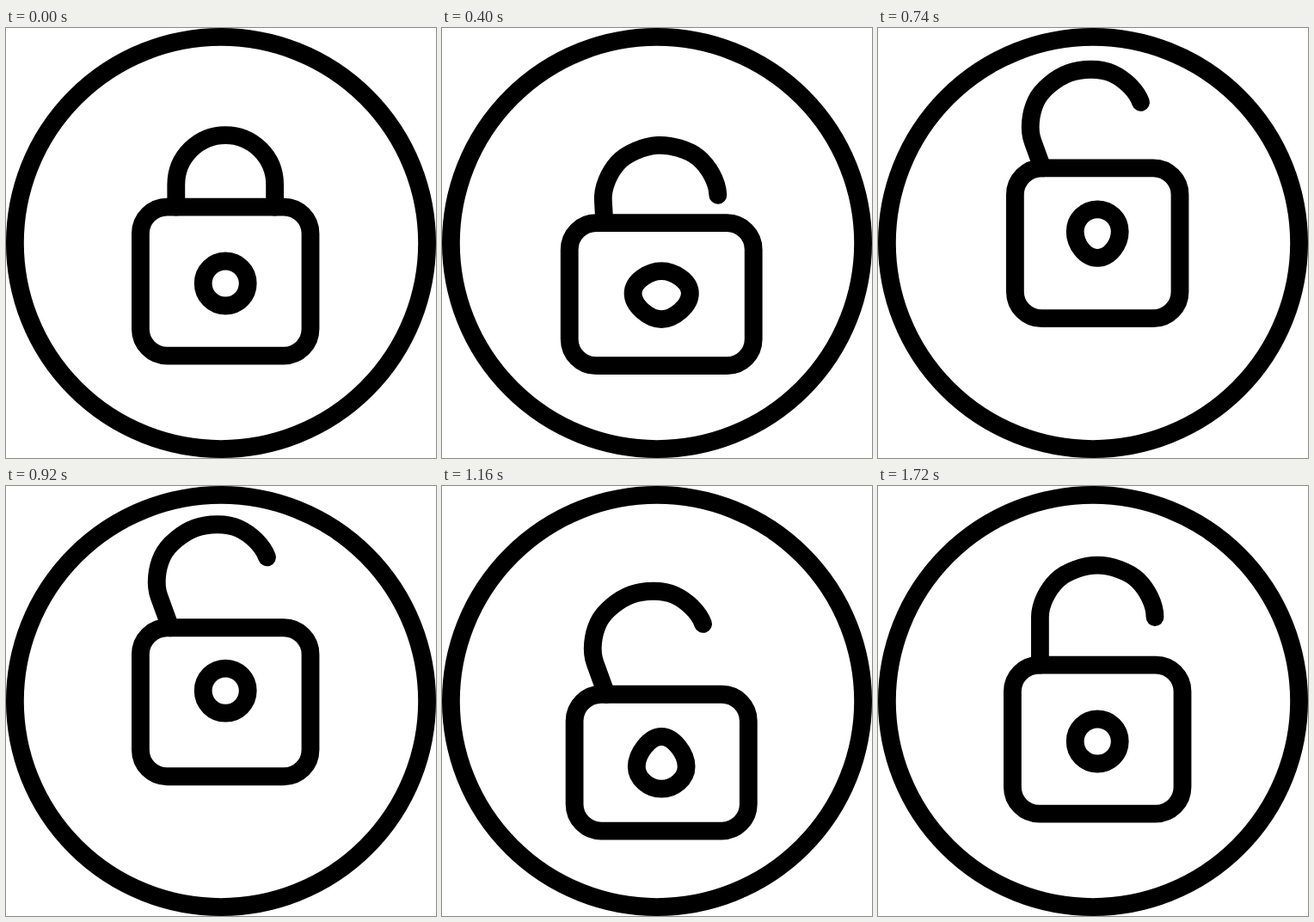
Animation, 500 px wide and 500 px high, one loop 2.42 s. Source, as an HTML page:

```html
<!DOCTYPE html>
<html lang="en">
<head>
<meta charset="utf-8">
<title>Padlock opening</title>
<style>
  html, body { margin: 0; width: 100%; height: 100%; overflow: hidden; background: #fff; }
  svg { display: block; width: 100%; height: 100%; }
</style>
</head>
<body>
<svg viewBox="0 0 500 500" fill="none" stroke="#000" stroke-width="20.8" stroke-linecap="round" stroke-linejoin="round">
  <circle cx="250" cy="250" r="239.6"/>
  <path id="shackle"/>
  <rect id="body" rx="31"/>
  <path id="keyhole"/>
</svg>
<script>
const LOOP = 2420, STEP = 20;
const MID = 255.2;          // vertical axis of the lock
const KEY_HANDLE = 14.4;    // Bezier handles keep their length while points move
const ARCH_HANDLE = 15.2;

// Main beats of the jump, in ms
const CROUCH = 280, FALL = 900, LAND = 1180;

const $ = id => document.getElementById(id);
const body = $('body'), keyhole = $('keyhole'), shackle = $('shackle');

// Smooth 0 to 1 between two times
function ease(t, from, to) {
  const u = Math.min(1, Math.max(0, (t - from) / (to - from)));
  return u * u * (3 - 2 * u);
}

// Smooth 0 to 1 and back to 0
const pulse = (t, from, peak, to) => ease(t, from, peak) - ease(t, peak, to);

// Height during crouch, leap, fall and settling
function hop(t, rest, low, apex, riseEnd, settleEnd) {
  return rest
    + (low - rest) * ease(t, 0, CROUCH)
    + (apex - low) * ease(t, CROUCH, riseEnd)
    + (low + 1.5 - apex) * ease(t, FALL, LAND)
    + (rest - low - 1.5) * ease(t, LAND, settleEnd);
}

function setAttrs(el, attrs) {
  for (const name in attrs) el.setAttribute(name, attrs[name]);
}

function keyholePath(y, w, up, down) {
  const h = KEY_HANDLE, l = MID - w, r = MID + w, top = y - up, low = y + down;
  return `M${MID} ${top}C${MID + h} ${top} ${r} ${y - h} ${r} ${y}`
    + `S${MID + h} ${low} ${MID} ${low}S${l} ${y + h} ${l} ${y}S${MID - h} ${top} ${MID} ${top}Z`;
}

// Starts at the foot of the left leg; the arch is four eighths of a turn
function shacklePath(w, h, leg, tail) {
  let d = `M0 0V${-leg}`;
  for (let i = 0; i < 4; i++) {
    const [a, b] = [i, i + 1].map(n => {
      const c = Math.cos(n * Math.PI / 4), s = Math.sin(n * Math.PI / 4);
      return { x: w - w * c, y: -leg - h * s, dx: ARCH_HANDLE * s, dy: -ARCH_HANDLE * c };
    });
    d += `C${a.x + a.dx} ${a.y + a.dy} ${b.x - b.dx} ${b.y - b.dy} ${b.x} ${b.y}`;
  }
  return d + `v${tail}`;
}

function draw(t) {
  const squash = pulse(t, 0, CROUCH, 620) + pulse(t, 1110, 1250, 1540);
  const crush = pulse(t, 0, CROUCH, 560) + pulse(t, 1080, 1160, 1600);
  const rise = pulse(t, CROUCH, 580, 860);
  const fall = pulse(t, 920, 1110, 1250);

  const w = 98.8 + 15.2 * squash - 7.6 * rise - 3 * fall;
  const h = 86.5 - 7.1 * crush + 2.3 * rise;
  const top = hop(t, 294.6, 321.2, 250.2, 750, 1505) - h;
  setAttrs(body, { x: MID - w, y: top, width: 2 * w, height: 2 * h });

  const keyY = hop(t, 297, 326, 236.8, 704, 1478);
  setAttrs(keyhole, {
    d: keyholePath(keyY, 26 + 10 * squash, 26 + 12.5 * fall, 26 + 11.5 * rise)
  });

  const widen = ease(t, 0, CROUCH);
  const archW = 57.4 + 9.4 * widen, archH = 57.5 + 3 * widen;
  const leg = 26 + 12.5 * ease(t, 560, FALL) + 17 * ease(t, 1160, 1460);
  const tail = leg * (1 - ease(t, CROUCH, 420));
  // Swings open, then rocks back and forth to upright
  const tilt = -20 * ease(t, CROUCH, 740) + 25.5 * ease(t, 1160, 1350)
    - 9.5 * ease(t, 1350, 1540) + 4 * ease(t, 1540, 1720);
  setAttrs(shackle, {
    d: shacklePath(archW, archH, leg, tail),
    transform: `translate(${MID - archW - 0.14 * tilt} ${top}) rotate(${tilt})`
  });
}

const start = performance.now();
function tick() {
  const t = (performance.now() - start) % LOOP;
  draw(Math.floor(t / STEP) * STEP);
  requestAnimationFrame(tick);
}
tick();
</script>
</body>
</html>
```
